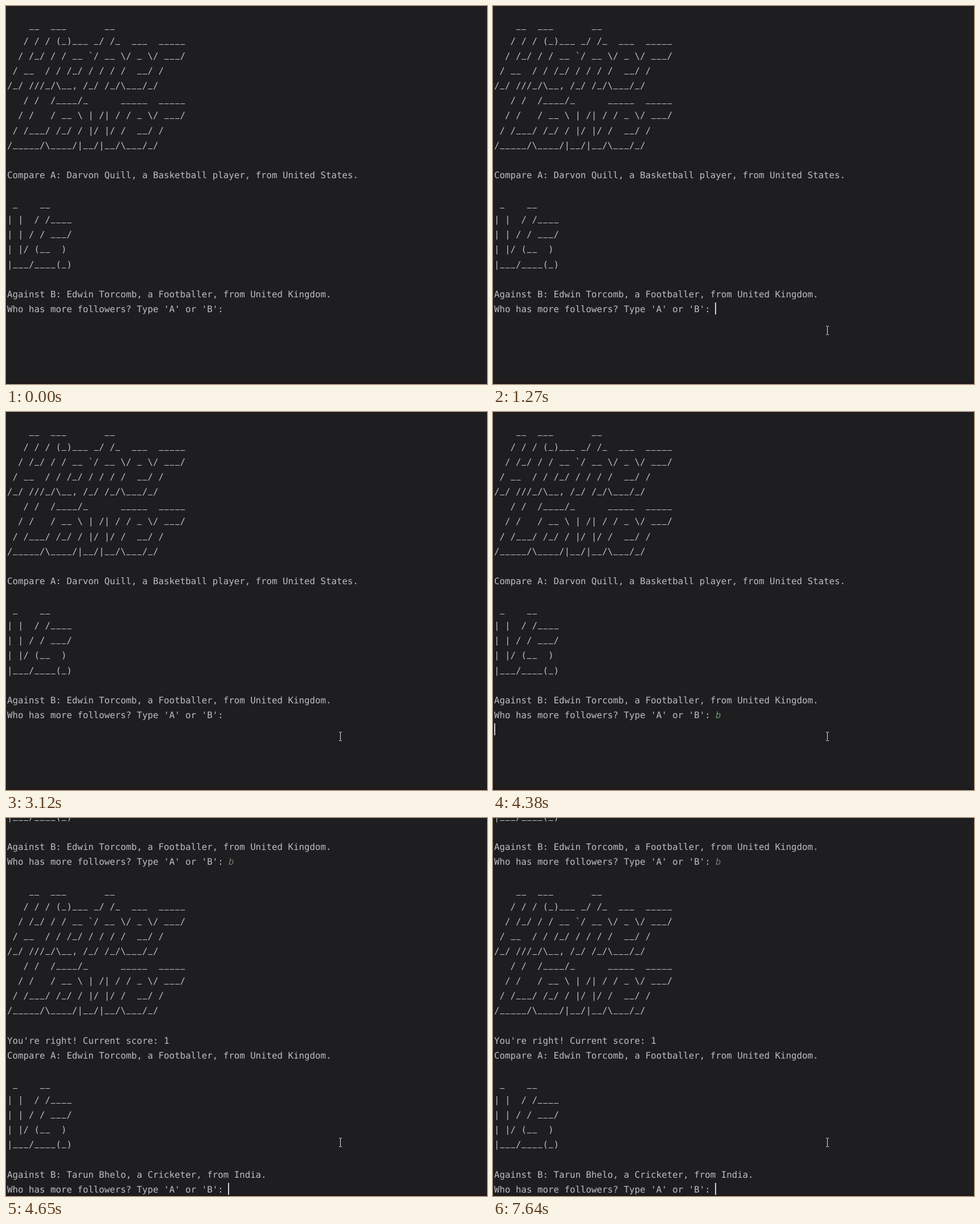
Write an HTML page that moves like this. It is 845 px wide and 663 px high and loops after 8000 ms.

```html
<!DOCTYPE html>
<html lang="en">
<head>
<meta charset="utf-8">
<title>Higher Lower</title>
<style>
  html, body { margin: 0; width: 100%; height: 100%; overflow: hidden; background: #1e1e20; }
  svg { display: block; }
  text {
    font: 15.77px "DejaVu Sans Mono", "Noto Sans Mono", monospace;
    fill: #bcbec4;
    white-space: pre;
    text-rendering: geometricPrecision;
  }
  .dashes { font: 500 13.2px "Noto Sans Mono", "DejaVu Sans Mono", monospace; }
  #answer { font-style: italic; }
</style>
</head>
<body>
<svg width="845" height="663" viewBox="0 0 845 663">
  <rect y="660" width="845" height="3" fill="#21181a"/>
  <g id="screen"></g>
  <rect id="caret" width="2" height="21" fill="#ced0d6"/>
  <circle id="click" cx="586" cy="568" r="14" fill="#ff0" fill-opacity=".47"/>
  <path id="mouse" d="M-2.5 -7.5H-.5M.5 -7.5H2.5M-2.5 7.5H-.5M.5 7.5H2.5M0 -7V7"
        fill="none" stroke="#e4e4e4" shape-rendering="crispEdges"/>
</svg>
<script>
const LOOP = 8000, LEFT = 2, CELL = 9.49, PITCH = 26.11, BASE = 40.8;
const DASH_INSET = 0.8, DASH_LIFT = 1;

const logo = [
  '    __  ___       __',
  '   / / / (_)___ _/ /_  ___  _____',
  '  / /_/ / / __ `/ __ \\/ _ \\/ ___/',
  ' / __  / / /_/ / / / /  __/ /',
  '/_/ ///_/\\__, /_/ /_/\\___/_/',
  '   / /  /____/_      _____  _____',
  '  / /   / __ \\ | /| / / _ \\/ ___/',
  ' / /___/ /_/ / |/ |/ /  __/ /',
  '/_____/\\____/|__/|__/\\___/_/'
];
const versus = [
  ' _    __',
  '| |  / /____',
  '| | / / ___/',
  '| |/ (__  )',
  '|___/____(_)'
];
const prompt = "Who has more followers? Type 'A' or 'B': ";
const player = 'Darvon Quill, a Basketball player, from United States.';
const footballer = 'Edwin Torcomb, a Footballer, from United Kingdom.';
const cricketer = 'Tarun Bhelo, a Cricketer, from India.';

const round = (a, b) => ['Compare A: ' + a, '', ...versus, '', 'Against B: ' + b, prompt];
const firstRound = [...logo, '', ...round(player, footballer)];
const nextRound = ['', ...logo, '', "You're right! Current score: 1", ...round(footballer, cricketer)];
const answerRow = firstRound.length - 1;

const $ = id => document.getElementById(id);
const rows = [];

function addText(str, row, x, lift = 0) {
  const el = document.createElementNS('http://www.w3.org/2000/svg', 'text');
  el.textContent = str;
  el.setAttribute('x', x);
  $('screen').append(el);
  rows.push({ el, row, lift });
  return el;
}

// Underscores are short dashes, each centred in its own cell.
function addLine(line, row) {
  const letters = line.replaceAll('_', ' ');
  if (letters.trim()) addText(letters, row, LEFT);
  const dashes = [...line.matchAll(/_/g)];
  if (!dashes.length) return;
  const xs = dashes.map(d => LEFT + d.index * CELL + DASH_INSET);
  addText('_'.repeat(dashes.length), row, xs.join(' '), DASH_LIFT).classList.add('dashes');
}

[...firstRound, ...nextRound].forEach(addLine);
const answer = addText('b', answerRow, LEFT + prompt.length * CELL);
answer.id = 'answer';

// start time, scroll offset
const scrolls = [[0, 0], [4580, 275.3], [4650, 454.5]];

// start time, caret position (none = hidden)
const carets = [
  [0], [1130, 390, 520], [2150], [2610, 390, 520], [3120], [3650, 390, 520],
  [3850, 400, 520], [4380, 2, 546], [4580], [4650, 390, 640], [5110],
  [5640, 390, 640], [6120], [6650, 390, 640], [7110], [7640, 390, 640]
];

const at = (steps, t) => steps.findLast(s => s[0] <= t);
const show = (el, on) => el.setAttribute('visibility', on ? 'visible' : 'hidden');

function placeMouse(t) {
  const step = Math.min(9, Math.floor((t - 110) / 68.8));
  const left = (1 - step / 9) ** 2;
  show($('mouse'), t >= 110);
  $('mouse').setAttribute('transform',
    `translate(${587.5 + Math.round(100 * left)} ${569 + Math.round(88 * left)})`);
}

let lastScroll;
function scrollTo(offset) {
  if (offset === lastScroll) return;
  lastScroll = offset;
  for (const { el, row, lift } of rows) {
    el.setAttribute('y', Math.round(BASE + row * PITCH - offset) - lift);
    show(el, row <= answerRow || offset > 0);
  }
}

function draw(t) {
  scrollTo(at(scrolls, t)[1]);
  show(answer, t >= 3850);
  answer.style.fill = t < 4580 ? '#629b6a' : '#6c7a70';

  const [, x, y] = at(carets, t);
  show($('caret'), x !== undefined);
  if (x !== undefined) {
    $('caret').setAttribute('x', x);
    $('caret').setAttribute('y', y);
  }

  show($('click'), t >= 1130 && t < 1270);
  placeMouse(t);
}

const start = performance.now();
function tick() {
  draw((performance.now() - start) % LOOP);
  requestAnimationFrame(tick);
}
tick();
</script>
</body>
</html>
```
